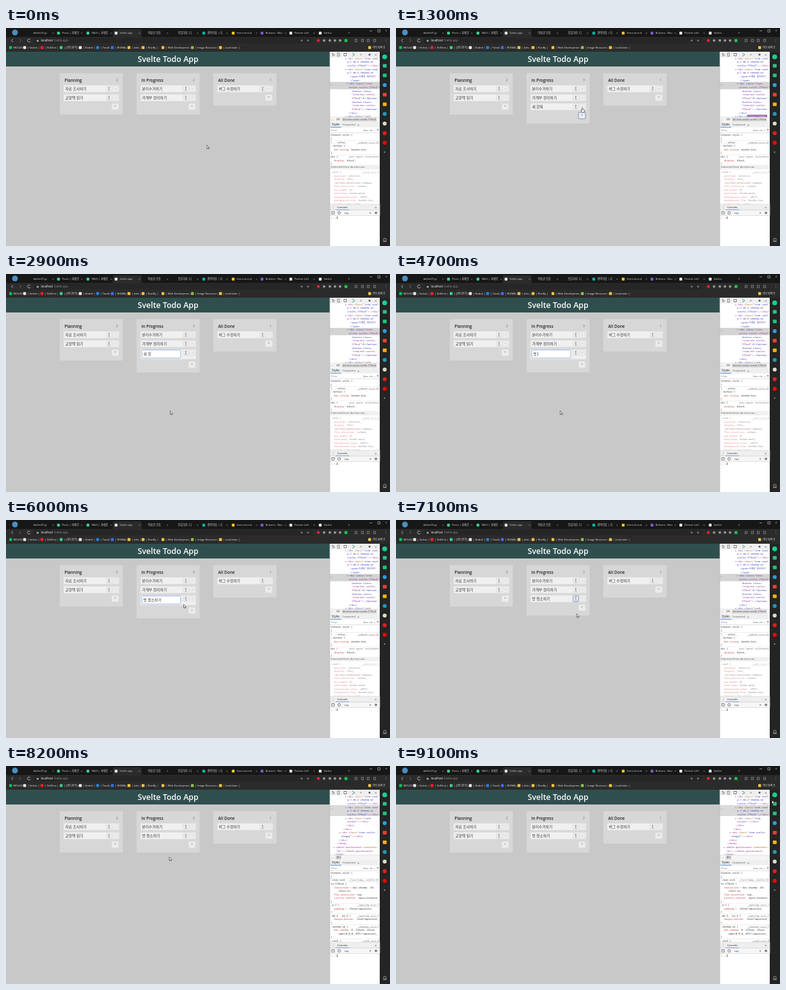
An HTML page with a canvas for the animation above (9200 ms loop, 600 by 340 pixels).

```html
<!DOCTYPE html>
<html lang="ko">
<head>
<meta charset="utf-8">
<style>
html, body { margin: 0; width: 100%; height: 100%; overflow: hidden; }
canvas { display: block; width: 600px; height: 340px; }
</style>
</head>
<body>
<canvas id="stage" width="600" height="340"></canvas>
<script>
const g = document.getElementById('stage').getContext('2d');
const LOOP = 9200, STEP = 100;
const UI = '"Open Sans", "Noto Sans CJK KR", "Noto Sans CJK", sans-serif';
const MONO = '"Noto Sans Mono", "DejaVu Sans Mono", "Noto Sans CJK KR", monospace';
const CODE = 3.75, CHAR = CODE * .6;

// Moments of the story, in ms
const ADD = 1100, EDIT = 2000, SAVE = 6500, REMOVE = 7600, RESTYLE = 8000;

function rect(x, y, w, h, fill, stroke) {
  if (fill) { g.fillStyle = fill; g.fillRect(x, y, w, h); }
  if (stroke) { g.strokeStyle = stroke; g.lineWidth = .7; g.strokeRect(x, y, w, h); }
}
function round(x, y, w, h, r, fill, stroke, width = .6) {
  g.beginPath();
  g.roundRect(x, y, w, h, r);
  if (fill) { g.fillStyle = fill; g.fill(); }
  if (stroke) { g.strokeStyle = stroke; g.lineWidth = width; g.stroke(); }
}
function dot(x, y, r, fill) {
  g.beginPath();
  g.arc(x, y, r, 0, 7);
  g.fillStyle = fill;
  g.fill();
}
function line(color, width, ...p) {
  g.beginPath();
  for (let i = 0; i < p.length; i += 2) g.lineTo(p[i], p[i + 1]);
  g.strokeStyle = color;
  g.lineWidth = width;
  g.stroke();
}
function text(s, x, y, size, color, { weight = 400, font = UI, align = 'left' } = {}) {
  g.font = `${weight} ${size}px ${font}`;
  g.textAlign = align;
  g.textBaseline = 'alphabetic';
  g.fillStyle = color;
  g.fillText(s, x, y + size * .35);
}
function clip(x, y, w, h, draw) {
  g.save();
  g.beginPath();
  g.rect(x, y, w, h);
  g.clip();
  draw();
  g.restore();
}

const TABS = [
  [34, 'dallim07.gi', ''], [79, 'Posts | 과제모', '#3ecf8e'], [125, 'TAGS | 과제모', '#3ecf8e'],
  [169, 'Svelte app', '#e8e8e8'], [213, '아침글 모음', ''], [260, '모임하루, 디', ''],
  [306, '경력이음 | 디', '#00b8a9'], [352, 'front-recruit', '#f3c623'], [397, 'Buttons · Boo', '#7a5cc9'],
  [442, 'Pointer Left', '#eee'], [488, 'Sorbix', '#e8eaf0']
];
const MARKS = [
  [5, 'MOLDO', '#03c75a'], [27, '| Sorbix |', '#e8eaf0'], [54, '| VidOrra |', '#f22'],
  [84, '| [코드분기] |', '#3ecf8e'], [114, '| Kodrel |', '#eee'], [141, '| Tasvik |', '#2684d8'],
  [164, '| RIDMA |', '#3a6ff0'], [190, '| Jobs |', '#f5c542'], [212, '| RiseBy |', '#f5c542'],
  [243, '| Web Developmen...', '#f5c542'], [289, '| Image Resource |', '#8bc34a'],
  [333, '| Look later |', '#f5c542'], [566, '기타 북마크', '#f5c542']
];

function browser() {
  rect(0, 0, 600, 14, '#171717');
  rect(0, 14, 600, 23, '#2b2b2b');
  round(167, 2, 45, 14, 2, '#2b2b2b');
  dot(14, 7, 4.5, '#4a8fc4');
  for (const [x, label, color] of TABS) {
    if (color) round(x + .8, 5.8, 4.4, 4.4, 1, color);
    clip(x + 7, 0, 31, 14, () => text(label, x + 8.5, 8, 4.2, '#d8d8d8'));
    if (x < 480) text('×', x + 38, 8, 5, '#999');
  }
  text('+', 536, 8, 6, '#bbb', { align: 'center' });
  line('#bbb', .7, 568, 4.5, 572, 4.5);
  rect(581, 2.8, 3.4, 3.4, null, '#bbb');
  text('×', 594, 4.5, 5.5, '#bbb', { align: 'center' });
  line('#ccc', .8, 11, 17, 8.5, 19.5, 11, 22);
  line('#777', .8, 21, 17, 23.5, 19.5, 21, 22);
  g.beginPath(); g.arc(36, 19.5, 2.4, .4, 5.6);
  g.strokeStyle = '#ccc'; g.lineWidth = .8; g.stroke();
  round(43, 15.5, 436, 8.5, 3, '#262626');
  rect(48, 18.7, 3, 2.6, '#aaa');
  text('localhost', 54.5, 19.7, 4.5, '#fff');
  text('Svelte app', 75, 19.7, 4.5, '#8a8a8a');
  [462, 472].forEach(x => dot(x, 19.5, 1.5, '#777'));
  dot(488, 19.5, 2.2, '#e02828');
  [497, 506, 514, 522].forEach(x => dot(x, 19.5, 1.9, '#999'));
  rect(529, 17.4, 4.4, 4.4, '#1ec94f');
  [547, 557, 566, 576].forEach(x => rect(x - 1.7, 17.8, 3.4, 3.4, null, '#999'));
  text('⋮', 591, 19.5, 5.5, '#ccc');
  for (const [x, label, color] of MARKS) {
    round(x, 28.3, 4.4, 4.4, .8, color);
    text(label, x + 6.5, 30.5, 4.1, '#eee');
  }
  rect(584, 37, 16, 303, '#242424');
  const side = ['#12d18e', '#2fbf8f', '#1fc47f', '#2f9be0', '#ef3e36', '#f5b400', '#2196b8', '#d8dccb', '#e02020', '#f00'];
  side.forEach((color, i) => {
    const y = i ? 44 + i * 15 : 45;
    if (i % 3 === 0 || i > 6) dot(591.7, y, i ? 3.1 : 3.8, color);
    else round(588.8, y - 2.8, 6, 5.6, 1, color);
  });
  text('+', 591.7, 194, 6, '#eee', { align: 'center' });
  round(590, 328, 4, 4.5, 1.8, null, '#bbb', .8);
  line('#bbb', .8, 589, 333, 595, 333);
}

function button(x, y, label, focused, w = 8.6, h = 9) {
  round(x - w / 2, y - h / 2, w, h, 1, '#ececec', focused ? '#6f8fc0' : '#dadada', focused ? .9 : .6);
  text(label, x, y, 4.8, '#555', { align: 'center' });
  if (label === 'E') line('#666', .5, x - 1.6, y + 2.5, x + 1.8, y + 2.5);
}

function column(x, title, items, { editing, plusFocus, editFocus } = {}) {
  const extra = editing === undefined ? 0 : 4.6;
  const plusY = 94.7 + items.length * 14 + extra;
  round(x, 70.5, 98.5, plusY - 58.2, 1, '#d7d7d7');
  text(title, x + 7.6, 81.5, 6.4, '#222', { weight: 600 });
  text(items.length, x + 91, 81.5, 5.6, '#777', { align: 'right' });
  items.forEach((label, i) => {
    const y = 94.8 + i * 14, edit = extra && i === items.length - 1;
    round(x + 6.3, y - 5.4, 86.5, edit ? 15.4 : 10.6, 1, '#f0f0f0', '#e2e2e2', .4);
    if (edit) {
      round(x + 8.3, 118.5, 60.5, 12.5, 1, '#fff', '#86aedb', .8);
      text(editing.text, x + 10.6, 124.9, 5.8, '#333');
      if (editing.caret) {
        const cx = x + 10.8 + g.measureText(editing.text).width;
        line('#222', .6, cx, 121.8, cx, 128);
      }
    } else text(label, x + 8.4, y, 5.8, '#333');
    button(x + 77, y, 'E', editFocus === i);
    button(x + 87, y, '-');
  });
  button(x + 86.6, plusY, '+', plusFocus, 11, 10);
}

// Text of the input while it is edited
const TYPING = [
  [0, '새 항목'], [2800, '새 항'], [3000, '새 '], [3100, '새'], [3200, 'ㅅ'], [3300, ''],
  [4300, 'ㅂ'], [4400, '바'], [4500, '방'], [4600, '방 '], [4800, '방 ㅊ'], [4900, '방 처'],
  [5000, '방 청'], [5100, '방 청ㅅ'], [5200, '방 청소'], [5300, '방 청소ㅎ'], [5400, '방 청소하'],
  [5500, '방 청소하ㄱ'], [5600, '방 청소하기']
];

function board(t) {
  rect(0, 37, 506, 303, '#c8c8c8');
  rect(0, 37, 506, 23, '#2f4f4f');
  text('Svelte Todo App', 253.2, 48.5, 12.4, '#fff', { weight: 600, align: 'center' });
  column(84, 'Planning', ['자료 조사하기', '교양책 읽기']);
  const items = ['분리수거하기'];
  if (t < REMOVE) items.push('가계부 정리하기');
  if (t >= ADD) items.push(t < SAVE ? '새 항목' : '방 청소하기');
  const editing = t >= EDIT && t < SAVE
    ? { text: TYPING.findLast(k => k[0] <= t)[1], caret: Math.floor(t / 530) % 2 === 0 }
    : undefined;
  column(204, 'In Progress', items, {
    editing, plusFocus: t >= ADD && t < EDIT - 200, editFocus: t >= SAVE && t < REMOVE ? 2 : -1
  });
  column(324, 'All Done', ['버그 수정하기']);
}

// Indent in characters, then the markup
const DOM_BEFORE = [
  [0, '▸<div class="item card'], [1, 'p-1 mb-2 shadow-sm'], [1, 'svelte-179er4">…</div>'],
  [0, '▾<div class="item card'], [1, 'p-1 mb-2 shadow-sm'], [3, '<span>가계부 정리하기'], [3, '</span>'],
  [1, '▾<div class="item-'], [2, 'action svelte-179er4">'], [4, '<button class='], [4, '"item-btn svelte-'],
  [4, '179er4">E</button>'], [4, '<button class='], [4, '"item-btn svelte-'], [4, '179er4">-</button>'],
  [2, '</div>'], [0, '▸<div class="card-']
];
const DOM_AFTER = [
  [0, '▸<div class="item card'], [1, 'p-1 mb-2 shadow-sm'], [1, 'svelte-179er4">…</div>'],
  [0, '▸<div class="item card'], [1, 'p-1 mb-2 shadow-sm'], [1, 'svelte-179er4">…</div>'],
  [0, '▸<div class="card-'], [1, 'action">…</div>'], [0, '</div>'], [-2, '</div>'],
  [-4, '▸<div class="item svelte-'], [-3, 'ehngq2">…</div>'], [-5, '</div>'], [-6, '</body>'],
  [-8, '▸<whale-quicksearch translate='], [-7, '"no">…</whale-quicksearch>'], [-8, '</html>']
];
function markup(rows) {
  let quoted = false;
  rows.forEach(([indent, row], i) => {
    const y = 47.5 + i * 5.66;
    let x = 531 + indent * CHAR;
    if (/^[▸▾]/.test(row)) {
      text(row[0], x - .8, y, 3.4, '#666');
      x += CHAR;
      row = row.slice(1);
    }
    for (const part of row.split(/("|class=|translate=|[가-힣][가-힣 ]+)/)) {
      if (!part) continue;
      const color = quoted ? '#3c3cb4' : /=$/.test(part) ? '#a55d1c' : /^[가-힣]/.test(part) ? '#222' : '#94348c';
      text(part, x, y, CODE, color, { font: MONO });
      x += g.measureText(part).width;
      if (part === '"') quoted = !quoted;
    }
  });
}

const CSS_BEFORE = `element.style {
}
*, ::after,|_reboot.scss:21
::before {
  box-sizing: border-box;
}
div {|user agent stylesheet
  display: block;
}`;
const CSS_CARD = `.card {|_card.scss:8
  position: relative;
  display: flex;
  -ms-flex-direction: column;
  flex-direction: column;
  min-width: 0;
  word-wrap: break-word;
  background-color: ☐#fff;
  background-clip: border-box;
  border:▸ 1px solid
    rgba(0,0,0,.125);`;
const CSS_AFTER = `element.style {
}
.item.svel|…/src/comp….svelte:61
te-179er4 {
  transition:▸ box-shadow .25s
    ☑ease-in;
  flex-direction: row;
  justify-content: space-between;
}
.p-1 {|_spacing.scss:7
  padding:▸ .25rem!important;
}
.mb-2, .my-2 {|_spacing.scss:7
  margin-bottom: .5rem!important;
}
.shadow-sm {|_shadows.scss:7
  box-shadow: 0 .125rem .25rem
    rgba(0,0,0,.075)!important;
}
.card {|_card.scss:8
  position: relative;`;
function styles(source, top, pitch) {
  source.split('\n').forEach((row, i) => {
    const x = 507.5, y = top + i * pitch, [left, link] = row.split('|');
    const [, prop, value] = left.match(/^(  \S+:)?(.*)$/);
    if (prop) text(prop.trim(), x + 5, y, CODE, '#c8403c', { font: MONO });
    const vx = prop ? x + 5 + g.measureText(prop.trim()).width : x + (left.startsWith('    ') ? 12 : 0);
    text(prop ? value : value.trim(), vx, y, CODE, '#333', { font: MONO });
    if (link) {
      text(link, 583, y, CODE, '#777', { font: MONO, align: 'right' });
      const w = g.measureText(link).width;
      if (!link.startsWith('user')) line('#aaa', .4, 583 - w, y + 2.2, 583, y + 2.2);
    }
    if (left === '}') line('#ddd', .5, 506, y + 2.9, 584, y + 2.9);
  });
}

function boxModel() {
  text('No matching selector or style', 545, 168.5, 4.3, '#777', { align: 'center' });
  line('#ddd', .6, 506, 174, 584, 174);
  const layers = [
    [517, 180, 56, 48, '#f4bd91', 'margin'], [522, 187, 46, 34, '#f7dc97', 'border'],
    [527, 194, 36, 21, '#c1d79e', 'padding'], [533, 201, 24, 8, '#8cb6c0', '']
  ];
  layers.forEach(([x, y, w, h, fill, label], i) => {
    g.setLineDash(i === 0 || i === 2 ? [1.5, 1] : []);
    rect(x, y, w, h, fill, i === 1 ? '#333' : '#7a6a5a');
    g.setLineDash([]);
    text(label, x + 4, y + 3.4, 3.8, '#555');
  });
  text('86.9 × 10.5', 545, 205, 3.8, '#335', { align: 'center' });
}

function devtools(t) {
  const after = t >= REMOVE;
  rect(506, 37, 78, 303, '#fff');
  rect(506, 37, 78, 9, '#efefef');
  line('#555', .7, 510, 39, 513.5, 42, 511, 44, 510, 39);
  rect(518, 39, 3, 5, null, '#666');
  round(526, 38, 8, 7.4, 1, '#fff');
  rect(528, 39.5, 4, 4, null, '#333');
  line('#2aa36a', .9, 541, 39, 545, 41.7, 541, 44);
  text('»', 553, 41, 6, '#555');
  dot(568, 41.5, 1.5, '#555');
  text('×', 576, 41.5, 6, '#555');
  clip(506, 46, 78, 93, () => {
    if (after) rect(506, 61, 78, 17, '#dadada');
    else rect(506, 84, 78, 11.5, '#d4d4d4');
    text('…', 507, after ? 66 : 87, 5, '#666');
    markup(after ? DOM_AFTER : DOM_BEFORE);
    const flash = (from, life) => t >= from && t < from + life ? 1 - (t - from) / life * .6 : 0;
    g.globalAlpha = flash(ADD, 600);
    rect(549, 135.3, 31, 5, '#86449d');
    text('class="card-', 550, 138, CODE, '#fff', { font: MONO });
    g.globalAlpha = flash(REMOVE, 600);
    rect(558, 55.6, 22, 5.6, '#a53ba5');
    rect(530, 61.2, 48, 11.4, '#b04fb3');
    text('"item card p-1', 531, 64.3, CODE, '#f0c8f4', { font: MONO });
    text('svelte-179er4"', 531, 70, CODE, '#f0c8f4', { font: MONO });
    g.globalAlpha = 1;
  });
  rect(506, 139, 78, 7.5, '#f4f4f4');
  line('#d0d0d0', .6, 506, 139, 584, 139);
  text('...', 508, 142, 4.5, '#555');
  if (after) {
    rect(515, 139.4, 9, 6.8, '#d9d9d9');
    text('div', 516.5, 142.7, 4.5, '#555');
  } else {
    text('div', 516, 142.7, 4.5, '#555');
    rect(525, 139.4, 54, 6.8, '#dcdcdc');
    text('div.item-action.svelte-179er4', 526, 142.7, 3.9, '#444');
  }
  rect(506, 146.5, 78, 8.5, '#efefef');
  text('Styles', 509, 150.8, 4.6, '#222');
  text('Computed', 525.5, 150.8, 4.1, '#555');
  text('»', 549, 150.8, 6, '#555');
  line('#3879d9', .9, 507, 154.8, 524, 154.8);
  text('Filter', 508, 159.3, 4.3, '#888');
  text(':hov .cls  +  ▣', 583, 159.3, 4, '#555', { align: 'right' });
  line('#ccc', .6, 506, 163.5, 584, 163.5);
  clip(506, 164, 78, 111, () => {
    if (!after) {
      styles(CSS_BEFORE, 167, 5.6);
      rect(506, 213.5, 78, 7, '#f0f0f0');
      text('Inherited from div.item.car…', 508, 217, 4.2, '#555');
      g.globalAlpha = .55;
      styles(CSS_CARD, 225, 5.5);
      line('#888', .4, 513, 241.5, 565, 241.5);
      g.globalAlpha = 1;
    } else if (t < RESTYLE) boxModel();
    else styles(CSS_AFTER, 167, 5.55);
  });
  rect(506, 275, 78, 9, '#efefef', '#d4d4d4');
  text('⋮', 509, 279.5, 5.5, '#555');
  text('Console', 517.5, 279.5, 4.3, '#222');
  text('×', 576, 279.5, 6, '#555');
  line('#3879d9', .9, 515, 283.6, 536, 283.6);
  rect(506, 284, 78, 8.5, '#f6f6f6', '#d4d4d4');
  rect(509, 286.5, 4, 3.6, null, '#555');
  g.beginPath(); g.arc(520.5, 288.3, 2, 0, 7);
  g.strokeStyle = '#555'; g.lineWidth = .8; g.stroke();
  text('top', 529, 288.3, 4.3, '#444');
  text('▾', 568, 288.3, 4.5, '#555');
  dot(578, 288.3, 1.8, '#555');
  dot(578, 288.3, .7, '#f6f6f6');
  text('›', 508, 296, 5.5, '#3879d9');
  text('…', 513, 295.5, 5, '#555');
  line('#222', .6, 517.5, 293.8, 517.5, 298);
  line('#bbb', .7, 506, 37, 506, 340);
}

// Time, x, y of the pointer tip
const POINTER = [
  [0, 314, 182.7], [300, 314, 182.7], [900, 291, 123.5], [1400, 291, 124.5], [1800, 280, 122.5],
  [2100, 280, 122.5], [2600, 256.5, 213.5], [5600, 256.5, 213.5], [6100, 280, 122], [6600, 280, 122],
  [6900, 282.3, 146.3], [7100, 282.3, 146.3], [7400, 290, 108.5], [7600, 290, 108.5],
  [7800, 255.2, 142], [8300, 255.2, 142], [9000, 587.5, 53.5], [LOOP, 587.5, 53.5]
];
function pointer(t) {
  const i = POINTER.findIndex(k => k[0] > t);
  const [t0, x0, y0] = POINTER[i - 1], [t1, x1, y1] = POINTER[i];
  const u = (t - t0) / (t1 - t0), e = u * u * (3 - 2 * u);
  const hand = t >= 900 && t < 2200 || t >= 6100 && t < 6700 || t >= 7400 && t < 7700;
  g.save();
  g.translate(x0 + (x1 - x0) * e, y0 + (y1 - y0) * e);
  const shape = new Path2D(hand
    ? 'M-.6 .5Q.2-.5 1 .5V3L3.6 3.6Q4 5 3.2 7H0L-2.2 4.3Q-1.6 3.4-.6 4.4Z'
    : 'M0 0V5.6L1.3 4.4L2.1 6.2L3 5.8L2.2 4.1H4Z');
  g.fillStyle = '#fff';
  g.fill(shape);
  g.strokeStyle = '#222';
  g.lineWidth = .6;
  g.stroke(shape);
  g.restore();
}

function frame(now) {
  const t = Math.floor(now % LOOP / STEP) * STEP;
  board(t);
  browser();
  devtools(t);
  pointer(t);
  requestAnimationFrame(frame);
}
requestAnimationFrame(frame);
</script>
</body>
</html>
```
